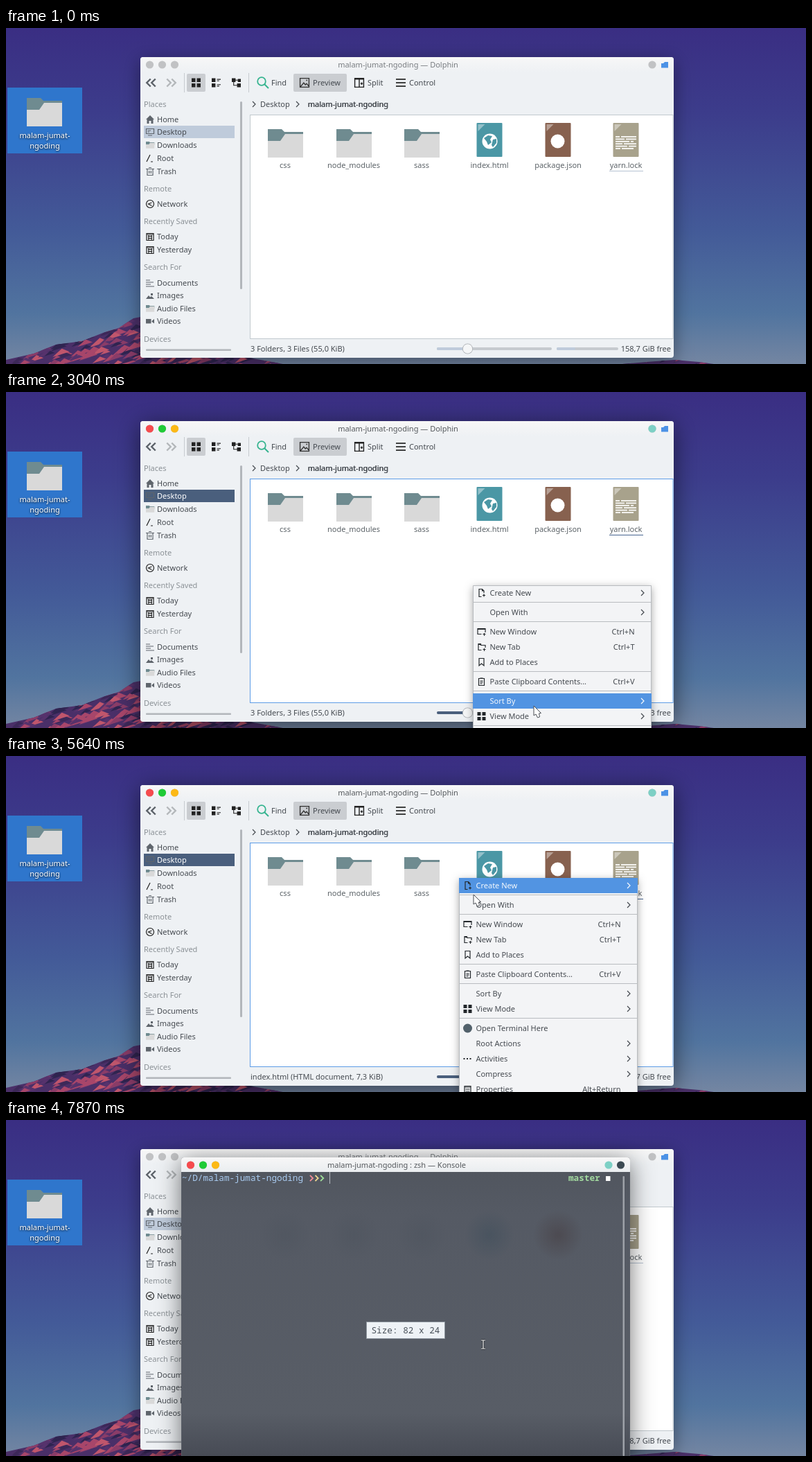
Write an HTML page with a canvas that moves like this. It is 1155x485 px and loops after 8 s.

```html
<!DOCTYPE html>
<html lang="en">
<head>
<meta charset="utf-8">
<title>File manager</title>
<style>
html, body { margin: 0; width: 100%; height: 100%; overflow: hidden; background: #3b3484; }
canvas { display: block; }
</style>
</head>
<body>
<canvas id="stage" width="1155" height="485"></canvas>
<script>
const c = document.getElementById('stage').getContext('2d');
const LOOP = 8000;
const UI = '11px "Noto Sans", "Open Sans", sans-serif';
const MONO = '12.7px "Noto Sans Mono", "DejaVu Sans Mono", monospace';
const INK = '#454a50', PALE = '#bfcbdb', NAVY = '#4a5f7d', BLUE = '#5294e2';

const ICONS = {
  home: 'M6 0L12 6H10.5V12H7.5V8H4.5V12H1.5V6H0Z',
  desk: 'M.5 1.5H11.5V8.5H.5ZM3 11H9M2.5 4H7M2.5 6H5',
  root: 'M1 11L6 1M7 11H10',
  trash: 'M0 2.5H12M4 .5H8M2 2.5V11.5H10V2.5M4.7 5V9M7.3 5V9',
  net: 'M6 .5A5.5 5.5 0 1 0 6.01 .5M8.5 4L3.5 6L8.5 8.5',
  cal: 'M1 1.5H11V11.5H1ZM1 3H11M3 5.5H9M3 8.5H9M4 4V11M8 4V11',
  doc: 'M0 2H6M0 5H11M0 8H7M0 11H12',
  img: 'M0 11L4 6L6 8.5L8 7L12 11ZM7 3H10V6H7Z',
  vid: 'M0 3H7.5V9.5H0ZM8.5 6L12 3V9.5L8.5 7Z',
  page: 'M6 11.5H2.5V.5H7L9.5 3V6M7 .5V3H9.5M7.5 9.5H11.5M9.5 7.5V11.5',
  win: 'M6 9.5H.5V1.5H11.5V7M1 2.5H11M8 9.5H12M10 8V12',
  tab: 'M6 10.5H1.5V1.5H5V3.5H11.5V7M1.5 2.5H5M8 9.5H12M10 8V12',
  mark: 'M2.5 .5H9.5V11L6 8L2.5 11Z',
  clip: 'M2 1.5H10V11.5H2ZM4 1H8M4 5H8M4 7H8M4 9H7',
  grid: 'M0 0H5V5H0ZM7 0H12V5H7ZM0 7H5V12H0ZM7 7H12V12H7Z',
  rows: 'M0 0H5V5H0ZM0 7H5V12H0ZM7 1H12V2H7ZM7 3H10V4H7ZM7 8H12V9H7ZM7 10H10V11H7Z',
  tree: 'M0 0H5V5H0ZM7 7H12V12H7ZM2 5H3V9H7V10H2ZM3 2H9V3H3ZM8 1H12V5H8Z',
  pic: 'M.5 .5H11.5V11.5H.5ZM1 11L5 6L7 8.5L8.5 7L11 10M8 3H9.5',
  split: 'M.5 .5H11.5V11.5H.5ZM0 1.5H12M6 1V12M7.5 7H10.5M9 5.5V8.5',
  dots: 'M0 5H2V7H0ZM4.5 5H6.5V7H4.5ZM9 5H11V7H9Z',
  props: 'M1.5 1.5H10.5V11.5H1.5ZM1.5 3H10.5M3 6H9M3 9H9'
};
const SOLID = ['home', 'img', 'vid', 'grid', 'rows', 'tree', 'dots'];

// Places: y, label, icon (headings have no icon)
const PLACES = [
  [110, 'Places'], [132, 'Home', 'home'], [150, 'Desktop', 'desk'], [169, 'Downloads', 'folder'],
  [188, 'Root', 'root'], [207, 'Trash', 'trash'], [232, 'Remote'], [254, 'Network', 'net'],
  [279, 'Recently Saved'], [301, 'Today', 'cal'], [320, 'Yesterday', 'cal'], [345, 'Search For'],
  [368, 'Documents', 'doc'], [386, 'Images', 'img'], [405, 'Audio Files', 'folder'],
  [423, 'Videos', 'vid'], [449, 'Devices']
];

// Menu rows: label, icon, right side ('>' opens a submenu); null is a separator
const MAIN = [
  ['Create New', 'page', '>'], null, ['Open With', '', '>'], null,
  ['New Window', 'win', 'Ctrl+N'], ['New Tab', 'tab', 'Ctrl+T'], ['Add to Places', 'mark'], null,
  ['Paste Clipboard Contents...', 'clip', 'Ctrl+V'], null,
  ['Sort By', '', '>'], ['View Mode', 'grid', '>'], null,
  ['Open Terminal Here', 'disc'], ['Root Actions', '', '>'], ['Activities', 'dots', '>'],
  ['Compress', '', '>'], ['Properties', 'props', 'Alt+Return']
];
const CREATE = [
  ['Folder...', 'page', 'F10'], null, ['Text File...', 'page'], ['HTML File...', 'page'],
  ['Empty File...', 'page'], null, ['Link to Location (URL)...', 'page'],
  ['Link to File or Directory...', 'page']
];
const SORT = [['Name', ''], ['Size', ''], ['Date', '']];

// Pointer path: time, x, y
const PATH = [
  [500, 690, 470], [1040, 674, 279], [1370, 674, 279], [1670, 712, 290], [1800, 712, 290],
  [2340, 790, 292], [2470, 790, 292], [3040, 762, 453], [3800, 762, 453], [4250, 593, 190],
  [4670, 593, 190], [5200, 654, 176], [5400, 654, 176], [5640, 675, 200], [5970, 675, 200],
  [6140, 689, 393], [6470, 689, 393], [7300, 689, 323], [7400, 689, 323], [7540, 689, 324]
];

const ramp = (t, a, b) => Math.min(1, Math.max(0, (t - a) / (b - a)));
const between = (t, a, b) => t >= a && t < b;

function pointer(t) {
  const i = PATH.findIndex(p => p[0] > t);
  if (i < 1) return PATH[i ? PATH.length - 1 : 0].slice(1);
  const [a, b] = [PATH[i - 1], PATH[i]];
  let k = ramp(t, a[0], b[0]);
  k *= k * (3 - 2 * k);
  return [a[1] + (b[1] - a[1]) * k, a[2] + (b[2] - a[2]) * k];
}

function rect(x, y, w, h, fill, r = 0) {
  c.fillStyle = fill;
  c.beginPath();
  c.roundRect(x, y, w, h, r);
  c.fill();
}
function disc(x, y, r, fill) {
  c.fillStyle = fill;
  c.beginPath();
  c.arc(x, y, r, 0, 7);
  c.fill();
}
function poly(points, fill) {
  c.fillStyle = fill;
  c.beginPath();
  points.forEach(p => c.lineTo(...p));
  c.closePath();
  c.fill();
}
function line(points, color, width = 1) {
  c.strokeStyle = color;
  c.lineWidth = width;
  c.beginPath();
  points.forEach(p => c.lineTo(...p));
  c.stroke();
}
function text(s, x, y, color = INK, align = 'left', font = UI) {
  c.font = font;
  c.textAlign = align;
  c.fillStyle = color;
  c.fillText(s, x, y + 4);
}
function shadow(blur, alpha, dy, draw) {
  c.save();
  c.shadowColor = `rgba(0,0,0,${alpha})`;
  c.shadowBlur = blur;
  c.shadowOffsetY = dy;
  draw();
  c.restore();
}
function vertical(y0, y1, ...stops) {
  const g = c.createLinearGradient(0, y0, 0, y1);
  stops.forEach(([at, color]) => g.addColorStop(at, color));
  return g;
}
function chevron(x, y, color, s = 4, dir = 1, width = 1.2) {
  line([[x - s / 2 * dir, y - s], [x + s / 2 * dir, y], [x - s / 2 * dir, y + s]], color, width);
}
function icon(name, x, y, color = INK, size = 12) {
  if (name === 'folder') return folder(x - 6, y - 5, .24);
  if (name === 'disc') return disc(x, y, 6.5, '#52616b');
  c.save();
  c.translate(x - size / 2, y - size / 2);
  c.scale(size / 12, size / 12);
  const p = new Path2D(ICONS[name]);
  c.fillStyle = c.strokeStyle = color;
  c.lineWidth = 1.2;
  SOLID.includes(name) ? c.fill(p) : c.stroke(p);
  c.restore();
}
function folder(x, y, s = 1) {
  c.save();
  c.translate(x, y);
  c.scale(s, s);
  poly([[0, 0], [20, 0], [24, 4], [51, 4], [51, 20], [0, 20]], '#6f8b90');
  poly([[0, 17], [18, 17], [25, 7], [51, 7], [51, 41], [0, 41]], '#d9d9d9');
  c.restore();
}

function ridge(points, count, rand) {
  c.save();
  poly(points, '#4a2f68');
  c.beginPath();
  points.forEach(p => c.lineTo(...p));
  c.clip();
  const x0 = points[0][0], span = points[points.length - 1][0] - x0;
  const tones = ['#a8466a', '#3c2858', '#8a3c68', '#2f2450', '#c0566c', '#56326c'];
  for (let i = 0; i < count; i++) {
    const x = x0 + rand() * span, y = 415 + rand() * 70, s = 4 + rand() * 9;
    poly([[x, y], [x + s, y + s * .4], [x - s * 1.2, y + s * 1.1]], tones[i % 6]);
  }
  c.restore();
}

function desktop() {
  rect(0, 0, 1155, 485, vertical(0, 485, [0, '#3a2e83'], [.25, '#3c3c8b'], [.6, '#435a98'],
    [.85, '#51749f'], [1, '#7486a2']));
  let seed = 11;
  const rand = () => (seed = seed * 16807 % 2147483647) / 2147483647;
  ridge([[0, 485], [0, 479], [40, 470], [72, 457], [110, 452], [140, 440], [163, 433], [184, 419],
    [200, 416], [240, 440], [330, 472], [400, 485]], 330, rand);
  ridge([[890, 485], [925, 482], [965, 479], [1000, 482], [1022, 485]], 50, rand);
  rect(2, 86, 108, 95, '#2f76cc');
  folder(30, 101);
  shadow(3, .9, 1, () => {
    text('malam-jumat-', 56, 155, '#fff', 'center');
    text('ngoding', 56, 170, '#fff', 'center');
  });
}

function trafficLights(x, y, lit) {
  ['#f54b4e', '#1fcb36', '#fcb916'].forEach((color, i) => {
    disc(x + 18 * i, y, 5.6, '#c1c2c4');
    c.globalAlpha = lit;
    disc(x + 18 * i, y, 5.6, color);
    c.globalAlpha = 1;
  });
}

function sheet(x, color) {
  rect(x, 137, 37, 49, color, 1);
  poly([[x + 2, 139], [x + 12, 139], [x + 2, 149]], 'rgba(255,255,255,.4)');
}

function files(active) {
  [['css', 403], ['node_modules', 502], ['sass', 600], ['index.html', 698], ['package.json', 797],
    ['yarn.lock', 895]].forEach(([name, x], i) => {
    if (i < 3) folder(x - 25, 146);
    else sheet(x - 18.5, ['#4b97a5', '#87614f', '#a8a28c'][i - 3]);
    text(name, x, 198, '#5c6368', 'center');
  });
  disc(698.5, 163.5, 11, '#fff');
  poly([[690, 159], [696, 155], [702, 156], [699, 161], [701, 165], [696, 169], [694, 164]], '#4b97a5');
  poly([[703, 161], [708, 160], [708, 166], [703, 172], [701, 169]], '#4b97a5');
  disc(796.5, 163.5, 10, '#fff');
  for (let i = 0; i < 6; i++) {
    const y = 157 + i * 3.4, gap = 6 + i * 7 % 17;
    line([[880, y], [880 + gap, y]], '#fff', 1.7);
    line([[882 + gap, y], [i % 3 == 2 ? 906 : 910, y]], '#fff', 1.7);
  }
  line([[871, 206.5], [920, 206.5]], active ? '#46648f' : '#b6c2d2');
}

function toolbar() {
  for (const d of [0, 7]) {
    chevron(206 + d, 79, '#5b6168', 5.5, -1, 2.4);
    chevron(235 + d, 79, '#b3b7ba', 5.5, 1, 2.4);
  }
  line([[257.5, 65], [257.5, 93]], '#c6cbcf');
  line([[350.5, 65], [350.5, 93]], '#c6cbcf');
  rect(261, 66, 27, 26, '#cacdd1', 2);
  rect(415, 66, 77, 26, '#cacdd1', 2);
  icon('grid', 274.5, 79, '#222', 13);
  icon('rows', 303.5, 79, '#222', 13);
  icon('tree', 332.5, 79, '#222', 13);
  c.strokeStyle = '#35b48f';
  c.lineWidth = 1.8;
  c.beginPath();
  c.arc(369, 77, 5.8, 0, 7);
  c.stroke();
  line([[373, 81], [379, 87]], '#35b48f', 2);
  icon('pic', 431, 79, '#333', 14);
  icon('split', 510, 79, '#222', 14);
  for (const y of [74, 79, 84]) line([[563, y], [577, y]], '#222', 1.7);
  text('Find', 383, 79);
  text('Preview', 443, 79);
  text('Split', 522, 79);
  text('Control', 582, 79);
}

function sidebar(active) {
  rect(199, 141, 131, 18, active ? NAVY : PALE);
  for (const [y, label, name] of PLACES) {
    const picked = active && label === 'Desktop';
    if (name) icon(name, 208, y, /root|net|cal/.test(name) ? '#222' : '#5f656c');
    text(label, name ? 218 : 199, y, !name ? '#8b9196' : picked ? '#fff' : INK);
  }
  rect(338, 106, 3, 271, '#b2b6bb', 1.5);
  rect(202, 463.5, 123, 2.5, '#b2b6bb', 1);
}

function fileWindow(t) {
  const active = between(t, 500, 6900), front = between(t, 500, 7540);
  const lit = front ? ramp(t, 500, 800) : 0;
  shadow(front ? 34 : 26, front ? .55 : .42, 6, () => rect(194, 42, 770, 434, '#eef1f4', 4));
  rect(194, 42, 770, 22, vertical(42, 64, [0, '#f7f7f7'], [1, '#eef1f4']), [4, 4, 0, 0]);
  trafficLights(207.5, 53, lit);
  disc(933, 53, 5.6, '#c1c2c4');
  c.globalAlpha = lit;
  disc(933, 53, 5.6, '#7dd0c5');
  c.globalAlpha = 1;
  poly([[946, 51], [949, 51], [951, 49], [956, 49], [956, 57.5], [946, 57.5]], '#4c92e6');
  text('malam-jumat-ngoding — Dolphin', 566, 53, front ? '#55595d' : '#797d81', 'center');
  toolbar();
  chevron(358, 110, INK);
  text('Desktop', 367, 110);
  chevron(421, 110, INK);
  text('malam-jumat-ngoding', 435.5, 110);
  text('malam-jumat-ngoding', 436, 110);
  sidebar(active);
  rect(352, 125, 611.5, 324, front ? '#5d9ce6' : '#c1c9ce');
  rect(353, 126, 609.5, 322, '#fff');
  files(active);
  text(between(t, 5100, 5970) ? 'index.html (HTML document, 7,3 KiB)' : '3 Folders, 3 Files (55,0 KiB)', 353, 463);
  rect(622, 461, 166, 4, '#c6cacf', 2);
  rect(622, 461, 44, 4, active ? NAVY : PALE, 2);
  disc(666.5, 463, 7.6, '#a9adb1');
  disc(666.5, 463, 6.8, '#f5f6f7');
  rect(795, 461, 89, 4, '#c6cacf', 2);
  rect(795, 461, 27, 4, active ? '#73859d' : PALE, 2);
  text('158,7 GiB free', 960, 463, INK, 'right');
}

function menu(rows, x, y, w, alpha, hoverY) {
  if (alpha <= 0) return;
  const tops = [];
  let h = 0;
  for (const row of rows) {
    tops.push(h);
    h += row ? 22 : 6;
  }
  const hot = rows.reduce((best, row, i) => row && y + tops[i] <= hoverY ? i : best, -1);
  c.save();
  c.globalAlpha = alpha;
  shadow(12, .35, 3, () => rect(x, y, w, h + 1, '#b7babe', 1));
  rect(x + 1, y + 1, w - 2, h - 1, '#f3f4f6');
  rows.forEach((row, i) => {
    const mid = y + tops[i] + (row ? 11 : 3);
    if (!row) return line([[x + 1, mid - .5], [x + w - 1, mid - .5]], '#b9bcc0');
    const [label, name, side] = row, color = i === hot ? '#f4f8fd' : INK;
    if (i === hot) rect(x, mid - 11, w, 22, BLUE);
    if (name) icon(name, x + 12.5, mid, '#23272b');
    text(label, x + 24.5, mid, color);
    if (side === '>') chevron(x + w - 13, mid, color);
    else if (side) text(side, x + w - 24.5, mid, color, 'right');
  });
  c.restore();
}

function menus(t, py) {
  if (between(t, 1370, 4670)) {
    const alpha = ramp(t, 1370, 1600) * (1 - .8 * ramp(t, 4250, 4400));
    const hover = t < 1450 || t > 4250 ? 0 : pointer(Math.min(t, 3800))[1];
    menu(MAIN, 674, 279, 258, alpha, hover);
    menu(CREATE, 931, 279, 213, ramp(t, 1800, 2000) * (1 - ramp(t, 2470, 2650)), 0);
    menu(SORT, 931, 435, 157, ramp(t, 3240, 3420) * (1 - ramp(t, 4200, 4350)), 0);
  }
  if (between(t, 5250, 6800))
    menu(MAIN, 654, 176, 258, ramp(t, 5250, 5450) * (1 - ramp(t, 6500, 6800)), t < 6500 ? py : 0);
}

function terminal(t) {
  shadow(34, .55, 6, () => rect(253, 54, 648, 450, '#575c66', 4));
  rect(253, 54, 648, 21, vertical(54, 75, [0, '#f7f7f7'], [1, '#eaedf0']), [4, 4, 0, 0]);
  trafficLights(266.5, 65, 1);
  disc(870, 65, 5.6, '#7dd0c5');
  disc(887.5, 65, 5.6, '#3c4a53');
  text('malam-jumat-ngoding : zsh — Konsole', 564, 65, '#55595d', 'center');
  rect(254, 75, 646, 410, vertical(75, 485, [0, '#51565f'], [.15, '#555a64'], [.85, '#585d66'], [1, '#474b55']));
  for (const [x, tone] of [[403, '80,86,96'], [502, '80,86,96'], [600, '80,86,96'], [698, '70,82,94'], [797, '74,70,76']]) {
    const g = c.createRadialGradient(x, 166, 2, x, 166, 36);
    g.addColorStop(0, `rgba(${tone},.75)`);
    g.addColorStop(1, `rgba(${tone},0)`);
    rect(x - 40, 126, 80, 80, g);
  }
  rect(890.5, 81, 2.5, 404, '#9da1a8', 1);
  text('~/D/malam-jumat-ngoding', 254, 84, '#a9cbf0', 'left', MONO);
  ['#f08d98', '#f0d890', '#9fe09a'].forEach((color, i) => chevron(441 + 7.6 * i, 84, color, 4.2, 1, 1.8));
  text('master', 812, 84, '#a3dba0', 'left', 'bold ' + MONO);
  rect(866, 81, 6.5, 7, '#fff');
  if (t >= 7870) rect(467, 75, 1, 17, '#b5b9bf');
  rect(520, 291, 114, 25, '#8f979f');
  rect(521, 292, 112, 23, '#eef2f6');
  text('Size: 82 x 24', 527.5, 304, '#4a525b', 'left', MONO);
}

function cursor(t, x, y) {
  if (t < 500) return;
  if (t >= 7300) {
    const beam = [[-3, -6], [3, -6], [0, -6], [0, 6], [-3, 6], [3, 6]].map(([a, b]) => [x + a, y + b]);
    const dark = t >= 7540;
    line(beam, dark ? '#2b2f35' : '#555', 3);
    line(beam, '#f4f4f4', 1.2);
    return;
  }
  const arrow = [[0, 0], [0, 14], [3, 12], [5.5, 17], [8.5, 16], [7.5, 11], [10.5, 10.5], [0, 0]]
    .map(([a, b]) => [x + a, y + b]);
  poly(arrow, '#fff');
  line(arrow, '#4b4f55', 1);
}

function draw(now) {
  const t = (now - start) % LOOP, [px, py] = pointer(t);
  desktop();
  fileWindow(t);
  menus(t, py);
  if (t >= 7540) terminal(t);
  cursor(t, px, py);
  requestAnimationFrame(draw);
}
const start = performance.now();
draw(start);
</script>
</body>
</html>
```
